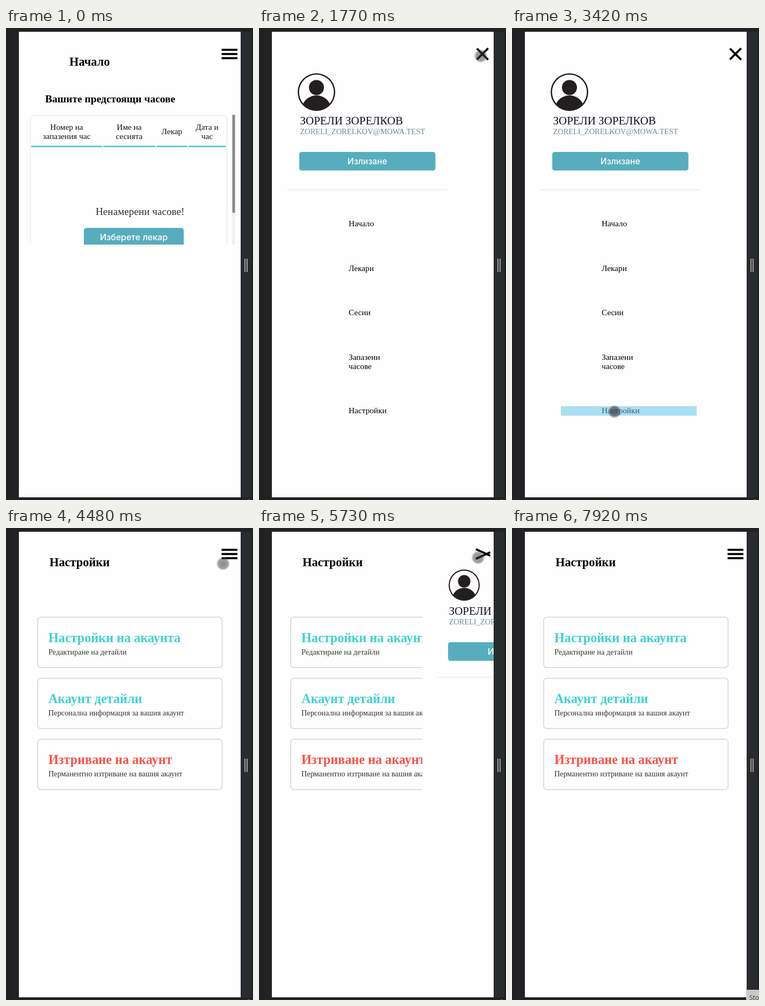
An HTML page with a canvas for the animation above (7.98 s loop, 460 px wide and 876 px high).

```html
<!DOCTYPE html>
<html lang="bg">
<head>
<meta charset="utf-8">
<title>Запазени часове</title>
<style>
  html, body { margin: 0; width: 100%; height: 100%; overflow: hidden; background: #222224; }
  canvas { display: block; }
</style>
</head>
<body>
<canvas id="stage" width="460" height="876"></canvas>
<script>
const LOOP = 7980;
const SERIF = '"Liberation Serif", "Times New Roman", serif';
const INTER = 'Inter, sans-serif';
const TEAL = '#57adbe', AQUA = '#42d0d2', RED = '#f9524c', INK = '#231f20', PAGE = '#fefefe';
const OPEN_TIME = 500, SLIDE = 620;
const ctx = document.getElementById('stage').getContext('2d');

const clamp = v => Math.min(1, Math.max(0, v));
const progress = (t, start, length) => clamp((t - start) / length);
const sine = p => (1 - Math.cos(Math.PI * p)) / 2;

// cubic-bezier(.25, .1, .25, 1)
function ease(x) {
  let low = 0, high = 1;
  for (let i = 0; i < 24; i++) {
    const u = (low + high) / 2;
    if (.75 * u * (1 - u) + u ** 3 < x) low = u; else high = u;
  }
  const u = low;
  return .3 * u * (1 - u) ** 2 + 3 * u * u * (1 - u) + u ** 3;
}

function box(x, y, w, h, color) {
  ctx.fillStyle = color;
  ctx.fillRect(x, y, w, h);
}

function roundBox(x, y, w, h, r, fill, stroke, line) {
  ctx.beginPath();
  ctx.roundRect(x, y, w, h, r);
  if (fill) { ctx.fillStyle = fill; ctx.fill(); }
  if (stroke) { ctx.strokeStyle = stroke; ctx.lineWidth = line; ctx.stroke(); }
}

function disc(x, y, r, fill) {
  ctx.beginPath();
  ctx.arc(x, y, r, 0, Math.PI * 2);
  ctx.fillStyle = fill;
  ctx.fill();
}

function text(str, x, y, size, color = '#000', weight = 400, family = SERIF, align = 'left') {
  ctx.font = `${weight} ${size}px ${family}`;
  ctx.textAlign = align;
  ctx.fillStyle = color;
  ctx.fillText(str, x, y);
}

function clipped(x, y, w, h, draw) {
  ctx.save();
  ctx.beginPath();
  ctx.rect(x, y, w, h);
  ctx.clip();
  draw();
  ctx.restore();
}

function drawFrame() {
  box(0, 0, 460, 876, '#222224');
  box(0, 0, 10, 876, '#202022');
  box(437, 7, 20, 864, '#282c2f');
  box(457, 7, 3, 864, '#1f2021');
  box(444, 428, 2, 25, '#a0a0a0');
  box(448, 428, 2, 25, '#a0a0a0');
  box(450, 875, 4, 1, '#777');
  box(24, 7, 413, 864, PAGE);
}

function drawHome() {
  text('Начало', 118, 70, 22.4, '#000', 700);
  text('Вашите предстоящи часове', 73, 138, 19.5, '#000', 700);
  clipped(24, 160, 413, 242, () => {
    roundBox(45.5, 162.5, 366, 300, 6, null, '#e9e9e9', 1.2);
    const columns = [
      [47, 179, ['Номер на', 'запазения час']],
      [181, 278, ['Име на', 'сесията']],
      [280, 337.5, ['Лекар']],
      [339.5, 409.5, ['Дата и', 'час']]
    ];
    for (const [left, right, lines] of columns) {
      box(left, 218.5, right - left, 2.7, '#4accd2');
      const top = lines.length > 1 ? 188.5 : 197;
      lines.forEach((s, i) => text(s, (left + right) / 2, top + 17 * i, 15.3, '#111', 400, SERIF, 'center'));
    }
    text('Ненамерени часове!', 167, 347, 19.2, '#333');
    roundBox(145, 371, 186, 40, 5, TEAL);
    text('Изберете лекар', 238, 394, 16, '#fff', 500, INTER, 'center');
    box(421, 161, 6, 241, '#f1f1f1');
    roundBox(421.5, 161, 5, 182, 1.5, '#8a8a8a');
  });
}

function drawSettings() {
  text('Настройки', 81, 71, 22.4, '#000', 700);
  const cards = [
    ['Настройки на акаунта', 'Редактиране на детайли', AQUA],
    ['Акаунт детайли', 'Персонална информация за вашия акаунт', AQUA],
    ['Изтриване на акаунт', 'Перманентно изтриване на вашия акаунт', RED]
  ];
  cards.forEach(([title, note, color], i) => {
    const y = 165.5 + 113.2 * i;
    roundBox(59, y, 343.5, 93.5, 6, null, '#dedede', 2);
    text(title, 79, y + 46.5, 24.2, color, 700);
    text(note, 79, y + 69.5, 14.3, '#333');
  });
}

function drawAvatar(x, y, size) {
  ctx.save();
  ctx.translate(x + size / 2, y + size / 2);
  ctx.scale(size / 70, size / 70);
  disc(0, 0, 35, INK);
  disc(0, 0, 32.4, PAGE);
  disc(0, -8.5, 14, INK);
  ctx.beginPath();
  ctx.arc(0, 0, 33, 0, Math.PI * 2);
  ctx.clip();
  disc(0, 34, 28, INK);
  ctx.restore();
}

// The panel contents shrink a little while it is off to the side.
function drawMenu(open, tapped) {
  const away = 1 - open;
  const left = 24 + SLIDE * away;
  if (left >= 437) return;
  const squeeze = (away / .45) ** .6;
  const up = 18 * squeeze;
  clipped(24, 7, 413, 864, () => {
    box(left, 7, 413, 864, PAGE);
    drawAvatar(left + 48 + squeeze, 84 - 7 * squeeze, 70 - 12 * squeeze);
    const x = left + 52.5 - 3 * squeeze;
    text('ЗОРЕЛИ ЗОРЕЛКОВ', x, 179 - up, 21, '#111122');
    text('ZORELI_ZORELKOV@MOWA.TEST', x, 197 - up, 14.4, '#708b96');
    const width = 253.5 - 32 * squeeze, buttonX = left + 51 - 3 * squeeze;
    roundBox(buttonX, 230 - up, width, 34.5, 4.5, TEAL);
    text('Излизане', buttonX + width / 2, 253 - up, 15.7, '#fff', 500, INTER, 'center');
    box(left + 28 + squeeze, 299.5 - 23 * squeeze, 298 - 15 * squeeze, 1.4, '#ececec');
    const items = [['Начало', 368], ['Лекари', 451], ['Сесии', 533], ['Запазени', 616], ['часове', 633], ['Настройки', 715]];
    for (const [label, y] of items) text(label, left + 143 - 9 * squeeze, y - 9 * squeeze, 15.3);
    if (tapped) {
      box(91, 702, 253, 17.5, '#aadff3');
      text('Настройки', 167, 715, 15.3, '#44606c');
    }
  });
}

function drawIcon(open) {
  const bar = (x, y, angle) => {
    ctx.save();
    ctx.translate(x, y);
    ctx.rotate(angle);
    box(0, -1.9, 29.5, 3.8, '#000');
    ctx.restore();
  };
  const angle = open * Math.PI / 4;
  bar(401.5 + 4.3 * open, 40.5 - 2.4 * open, angle);
  bar(401.5 + 4.3 * open, 56 + 2.4 * open, -angle);
  ctx.globalAlpha = clamp(1.2 - 2.2 * open);
  bar(401.5, 48.3, 0);
  ctx.globalAlpha = 1;
}

// start, length, from x, y, to x, y, sideways bend
const moves = [
  [130, 920, 452, 880, 413, 52, 0],
  [2390, 850, 413, 52, 191, 712, 0],
  [3710, 840, 191, 712, 408, 55, 0],
  [5800, 850, 408, 55, 444, 870, -22]
];
const presses = [[1250, 1400], [3290, 3490], [4610, 4740], [5590, 5700]];

function drawCursor(t) {
  if (t < 190 || t >= 6660) return;
  const [start, length, x0, y0, x1, y1, bend] = moves.filter(m => m[0] <= t).pop();
  const p = sine(progress(t, start, length));
  const x = x0 + (x1 - x0) * p + bend * Math.sin(Math.PI * p);
  const y = y0 + (y1 - y0) * p;
  const pressed = presses.some(([from, to]) => t >= from && t < to);
  const shade = ctx.createRadialGradient(x, y, 0, x, y, 11.8);
  shade.addColorStop(0, `rgba(45,45,52,${pressed ? .72 : .55})`);
  shade.addColorStop(.78, `rgba(60,60,66,${pressed ? .6 : .48})`);
  shade.addColorStop(.86, 'rgba(110,110,114,.42)');
  shade.addColorStop(1, 'rgba(120,120,124,.36)');
  disc(x, y, 11.8, shade);
}

function drawTooltip(t) {
  ctx.globalAlpha = progress(t, 7660, 200);
  roundBox(436, 857, 40, 30, 3, '#cacaca');
  text('Stop', 442, 876, 12, '#3a3a3a', 400, '"Open Sans", sans-serif');
  ctx.globalAlpha = 1;
}

function menuOpen(t) {
  if (t < 3490) return ease(progress(t, 1260, OPEN_TIME));
  if (t < 5400) return ease(progress(t, 4620, OPEN_TIME));
  return 1 - ease(progress(t, 5595, OPEN_TIME));
}

function render(now) {
  const t = now % LOOP;
  const open = menuOpen(t);
  drawFrame();
  if (t < 3490) drawHome(); else drawSettings();
  drawMenu(open, t >= 3415 && t < 3490);
  drawIcon(open);
  drawCursor(t);
  drawTooltip(t);
  requestAnimationFrame(loop);
}

let origin;
function loop(now) {
  origin ??= now;
  render(now - origin);
}
requestAnimationFrame(loop);
</script>
</body>
</html>
```
